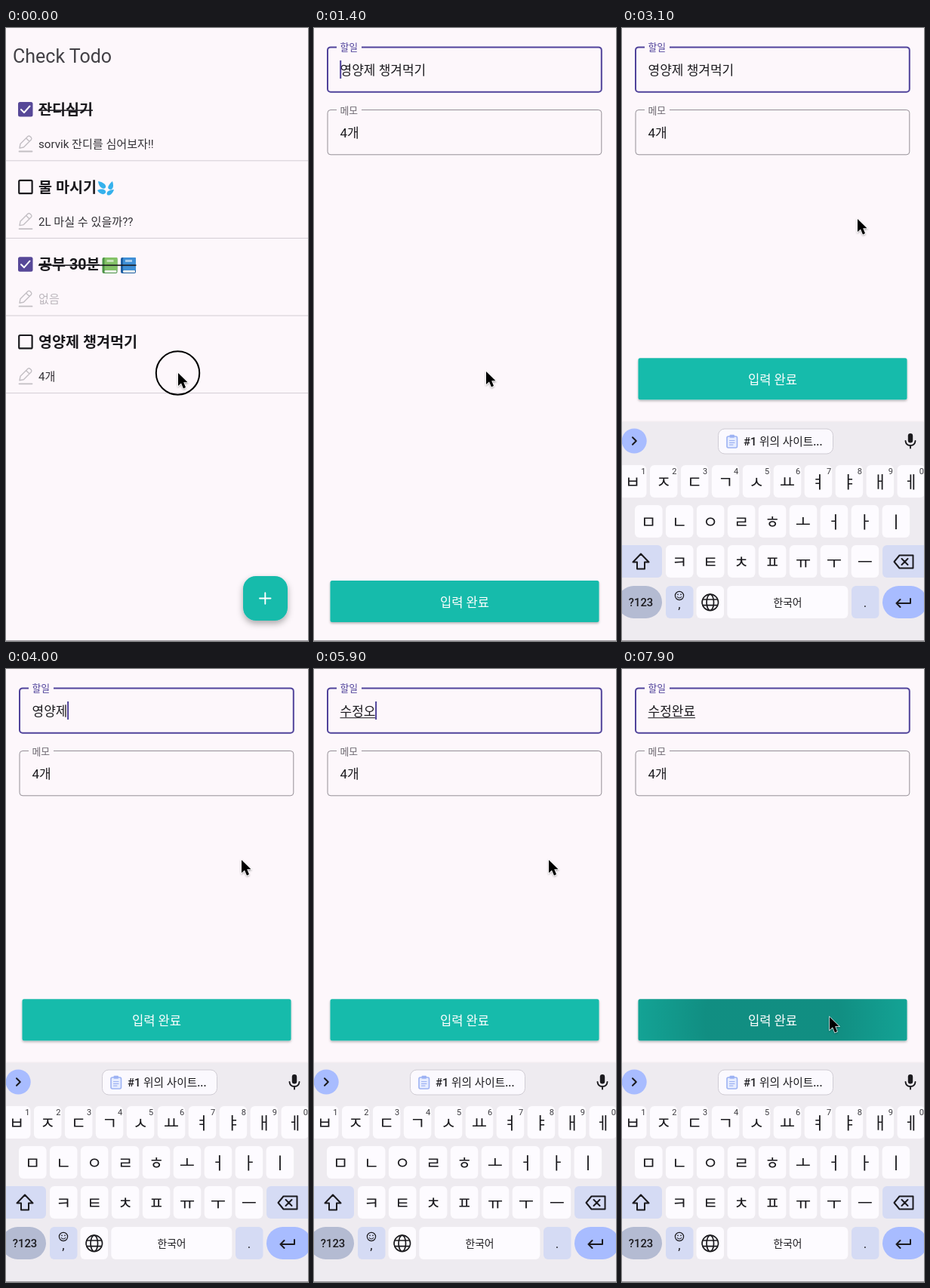
Write an HTML page that moves like this. It is 400 by 812 pixels and loops after 8000 ms.

```html
<!DOCTYPE html>
<html lang="ko">
<head>
<meta charset="utf-8">
<title>Check Todo</title>
<style>
  html, body { margin: 0; height: 100%; overflow: hidden; background: #fdf7fb; }
  svg { display: block; width: 100vw; height: 100vh; }
  text { font-family: Roboto, 'Noto Sans CJK KR', 'Noto Sans CJK', sans-serif; white-space: pre; }
  .line { fill: none; stroke-linecap: round; stroke-linejoin: round; }
</style>
</head>
<body>
<svg id="stage" viewBox="0 0 400 812"></svg>
<script>
const BG = '#fdf7fb', TEAL = '#17bbab', PURPLE = '#50439b', INK = '#1b1a1e';
const LOOP = 8000, STEP = 100;

// Markup helpers
const rect = (x, y, w, h, r, fill, extra = '') =>
  `<rect x="${x}" y="${y}" width="${w}" height="${h}" rx="${r}" fill="${fill}" ${extra}/>`;
const text = (x, y, size, str, fill = INK, extra = '') =>
  `<text x="${x}" y="${y}" font-size="${size}" fill="${fill}" ${extra}>${str}</text>`;
const line = (d, color = INK, width = 2) =>
  `<path class="line" d="${d}" stroke="${color}" stroke-width="${width}"/>`;
const at = (x, y, body) => `<g transform="translate(${x} ${y})">${body}</g>`;
const middle = 'text-anchor="middle"';

// Todo list
const drops = at(120, 201,
  `<g fill="#35b1ec"><path d="M2 2C8 3 13 6 12 10C10 14 3 11 2 2Z"/>
   <path d="M21 2C23 8 22 13 18 13C13 12 15 7 21 2Z"/>
   <path d="M1 14C7 11 13 13 12 17C10 21 4 19 1 14Z"/>
   <path d="M23 13C21 19 17 22 14 20C12 16 17 13 23 13Z"/></g>`);
const book = (x, color, dark) => at(x, 304,
  rect(0, 0, 20, 21, 2, dark) + rect(3, 17, 16, 3, 1, '#eef1ee') +
  rect(3, 0, 17, 17, 1, color) + rect(6, 3, 9, 3, 0, '#ffffff', 'opacity=".55"'));

const pencil = line('M17.5 163.5H34.5', '#c3bfc4', 1.8) +
  line('M18 159L19 153.5L29 143.5Q30.5 142.3 32 143.7L33.3 145Q34.5 146.5 33.3 148L23.3 158Z M26.7 146L31 150.3', '#c3bfc4', 1.4);

function todo(row, title, memo, done, strikeEnd, memoColor = '#333136') {
  const box = done
    ? rect(16, 98, 19.5, 19.5, 2.5, '#574898') + line('M20 108L24 112L31.5 103.5', '#fff', 2)
    : rect(17.2, 99.2, 17.4, 17.4, 1.5, 'none', `stroke="${INK}" stroke-width="2.2"`);
  return at(0, row * 102.6, box + pencil +
    text(43, 115.2, 19.6, title, INK, 'font-weight="bold"') +
    (done ? rect(43, 108.3, strikeEnd - 43, 1.6, 0, INK) : '') +
    text(43, 159, 15.1, memo, memoColor) + rect(0, 175.3, 400, 1, 0, '#d3ced4'));
}

const listScreen = text(9, 46, 25, 'Check Todo', '#434146') +
  book(127.5, '#84c267', '#4d9447') + book(152, '#3f8fd6', '#1f5fa3') +
  todo(0, '잔디심기', 'sorvik 잔디를 심어보자!!', true, 115) +
  todo(1, '물 마시기', '2L 마실 수 있을까??') +
  todo(2, '공부 30분', '없음', true, 172.5, '#bcb7bd') +
  todo(3, '영양제 챙겨먹기', '4개') + drops +
  rect(314, 726, 59, 59, 17, TEAL, 'filter="url(#fabShadow)"') +
  line('M336 755.5H350.5M343.3 748.3V762.8', '#fff', 1.9);

// Edit form
const outline = (id, y, color, width, label, labelColor) =>
  rect(18, y, 362.8, 59.3, 4, 'none', `id="${id}" stroke="${color}" stroke-width="${width}"`) +
  rect(30, y - 2, 33, 5, 0, BG) + text(34.5, y + 5, 12.8, label, labelColor);

const formScreen = rect(0, 0, 400, 812, 0, BG) +
  outline('todoBox', 25.4, PURPLE, 2, '할일', PURPLE) +
  text(34.5, 62, 17, '', INK, 'id="todoText"') +
  rect(34.5, 64.2, 0, 1, 0, INK, 'id="underline"') +
  rect(34.2, 43, 2, 24, 0, PURPLE, 'id="caret"') +
  `<g id="memo">${outline('memoBox', 108.5, '#948f96', 1, '메모', '#6d6870')}
   ${text(34.5, 145.3, 17, '4개')}</g>
   <g id="button">${rect(21.5, 0, 356, 55, 2.5, TEAL, 'filter="url(#buttonShadow)"')}
   ${rect(21.5, 0, 356, 55, 2.5, 'url(#ripple)', 'id="press"')}
   ${text(199.5, 35, 16.6, '입력 완료', '#fff', middle)}</g>`;

// Keyboard
const KEY = '#fdfbff', TINT = '#d5dbf4', BLUE = '#a8bcff', PITCH = 40.95;
const key = (x, y, w = 36.5, fill = KEY, r = 6) => rect(x, y, w, 43, r, fill);
const jamoRow = (letters, x, y) => [...letters].map((letter, i) =>
  key(x + i * PITCH, y) +
  text(x + 18.2 + i * PITCH, y + 29.5, 22, letter, INK, middle)).join('');
const digits = [...'1234567890'].map((digit, i) =>
  text(28.3 + i * PITCH, 591, 11, digit, '#3a393e', middle)).join('');

const keyboard = rect(0, 522, 400, 300, 0, '#eeebf0', 'filter="url(#edge)"') +
  `<circle cx="16.2" cy="547" r="16.5" fill="${BLUE}"/>` +
  line('M14 542.3L18.8 547L14 551.7', INK, 2) +
  rect(127.5, 531, 152, 33, 8.5, '#fbf9fe', 'stroke="#d0ccd4"') +
  rect(139, 541, 13.5, 15, 2, '#e6ecff', 'stroke="#9db2f3" stroke-width="1.6"') +
  rect(142.5, 538.7, 6.5, 4, 1, '#9db2f3') +
  line('M142.5 546.5H149M142.5 549.3H149M142.5 552.1H147', '#9db2f3', 1.2) +
  text(161, 552.5, 14.7, '#1 위의 사이트...', INK, 'font-weight="500"') +
  rect(378.8, 537, 6.4, 12.5, 3.2, INK) +
  line('M375.5 547Q376 553 382 553Q388 553 388.5 547M382 553V556.5', INK, 1.9) +
  jamoRow('ㅂㅈㄷㄱㅅㅛㅕㅑㅐㅔ', -4, 579) + digits +
  jamoRow('ㅁㄴㅇㄹㅎㅗㅓㅏㅣ', 17, 632) +
  key(-8, 685, 61, TINT) + jamoRow('ㅋㅌㅊㅍㅠㅜㅡ', 58, 685) + key(345, 685, 63, TINT) +
  line('M25 696.5L35.5 707.5H30V716.5H20V707.5H14.5Z', INK, 2) +
  line('M367.5 698.5H385.5V715.5H367.5L360.5 707ZM370.5 703L378.5 711M378.5 703L370.5 711', INK, 2) +
  key(-6, 739, 59, '#b4bbd2', 21.5) + text(25, 766, 14.8, '?123', INK, middle + ' font-weight="500"') +
  key(58, 739, 36.5, TINT) +
  `<circle cx="76" cy="752" r="5.6" fill="none" stroke="${INK}" stroke-width="1.2"/>` +
  line('M74 750.3V750.5M78 750.3V750.5', INK, 1.6) + line('M73.2 753.5Q76 756.6 78.8 753.5', INK, 1.1) +
  text(76, 769, 17, ',', INK, middle) +
  key(98.5, 739) +
  `<g fill="none" stroke="${INK}" stroke-width="1.7"><circle cx="116.8" cy="760.8" r="10.7"/>
   <ellipse cx="116.8" cy="760.8" rx="4.7" ry="10.7"/></g>` +
  line('M107.4 757H126.2M107.4 764.6H126.2', INK, 1.6) +
  key(139.3, 739, 160) + text(219.5, 765.5, 13.8, '한국어', INK, middle) +
  key(304, 739, 36.5, TINT) + text(322, 767, 17, '.', INK, middle) +
  key(345, 739, 59, BLUE, 21.5) +
  line('M382 756V762H363.5M368.5 757L363.5 762L368.5 767', INK, 2);

document.getElementById('stage').innerHTML = `
<defs>
  <filter id="fabShadow" x="-30%" y="-30%" width="160%" height="170%">
    <feDropShadow dx="0" dy="4" stdDeviation="4" flood-opacity=".32"/></filter>
  <filter id="buttonShadow" x="-5%" y="-20%" width="110%" height="150%">
    <feDropShadow dx="0" dy="1.8" stdDeviation="1.6" flood-opacity=".28"/></filter>
  <filter id="edge" x="-2%" y="-3%" width="104%" height="106%">
    <feDropShadow dx="0" dy="-1" stdDeviation="1" flood-opacity=".06"/></filter>
  <filter id="cursorShadow" x="-40%" y="-30%" width="190%" height="170%">
    <feDropShadow dx="0" dy="1.2" stdDeviation="1" flood-opacity=".35"/></filter>
  <radialGradient id="ripple" gradientUnits="userSpaceOnUse" cx="199" cy="27" r="178">
    <stop offset=".5" stop-opacity=".24"/><stop offset="1" stop-opacity=".13"/></radialGradient>
</defs>
${rect(0, 0, 400, 812, 0, BG)}
<g id="list">${listScreen}</g>
<g id="form">${formScreen}</g>
<g id="keyboard">${keyboard}</g>
${rect(0, 811, 400, 1, 0, '#9b979c')}
<circle id="ring" cx="227.5" cy="457" r="28.7" fill="none" stroke="#000" stroke-width="2"/>
<path id="cursor" d="M1 1V18L5 14.4L8 21.4L11 20.1L8.2 13.3H13.5Z" stroke="#fff"
  stroke-width="1.3" paint-order="stroke" filter="url(#cursorShadow)"/>`;

const ids = ['list', 'form', 'keyboard', 'ring', 'cursor', 'todoBox', 'todoText',
  'underline', 'caret', 'memo', 'button', 'press', 'ripple'];
const el = Object.fromEntries(ids.map(id => [id, document.getElementById(id)]));
const set = (id, attrs) => {
  for (const name in attrs) el[id].setAttribute(name, attrs[name]);
};
const progress = (t, from, to) => Math.min(1, Math.max(0, (t - from) / (to - from)));
const smooth = p => p * p * (3 - 2 * p);

// Text edits: each entry is [time, text], and restarts the caret blink
const OLD = '영양제 챙겨먹기';
const typed = ['ㅅ', '수', '숮', '수저', '수정', '수정ㅇ', '수정오', '수정와', '수정완', '수정완ㄹ', '수정완료'];
const edits = [[1300, OLD], [3300, OLD],
  ...[...OLD].map((_, i) => [3600 + i * 100, OLD.slice(0, OLD.length - 1 - i)]),
  ...typed.map((str, i) => [5000 + i * 140, str])];

// Pointer stops: [time, x, y]
const pointer = [[0, 227, 456], [800, 227, 456], [900, 227, 454], [2300, 227, 454], [2900, 311, 252],
  [4400, 311, 252], [4600, 310, 252], [6500, 310, 252], [7100, 280, 445], [7200, 280, 445],
  [7600, 274, 460], [LOOP, 274, 460]];

function pointerAt(t) {
  const i = pointer.findIndex(stop => stop[0] > t);
  const [t0, x0, y0] = pointer[i - 1], [t1, x1, y1] = pointer[i];
  const p = smooth(progress(t, t0, t1));
  return `translate(${x0 + (x1 - x0) * p} ${y0 + (y1 - y0) * p})`;
}

function draw(t) {
  set('ring', { opacity: t < 100 ? 1 : t < 200 ? 0.4 : 0 });
  set('cursor', { transform: pointerAt(t) });

  const enter = progress(t, 900, 1300);
  set('list', { opacity: enter < 1 ? 1 : 0 });
  set('form', { opacity: enter, transform: `translate(0 ${40 * (1 - enter) ** 3})` });

  const [editTime, value] = edits.filter(edit => edit[0] <= t).pop() || edits[0];
  el.todoText.textContent = value;
  const width = value ? el.todoText.getComputedTextLength() : 0;
  const shrink = value ? 0 : 2;
  const caretOn = t >= 1300 && (t - editTime) % 1000 < 500;
  set('todoBox', { height: 59.3 - shrink });
  set('memo', { transform: `translate(0 ${-shrink})` });
  set('underline', { width: t >= 5000 ? width : 0 });
  set('caret', { x: 34.2 + (t < 3300 ? 0 : width), y: 43 - shrink / 2, opacity: caretOn ? 1 : 0 });

  const rise = progress(t, 1500, 2000);
  set('keyboard', { transform: `translate(0 ${290 * (1 - rise) ** 3})`, opacity: rise > 0 ? 1 : 0 });
  set('button', { transform: `translate(0 ${t < 1600 ? 732 : 437.2})` });

  const press = progress(t, 7700, 7900);
  set('press', { opacity: press });
  set('ripple', { cx: 274 - 75 * press, r: 60 + 118 * press });
}

function tick() {
  draw(Math.floor((performance.now() % LOOP) / STEP) * STEP);
  requestAnimationFrame(tick);
}
tick();
</script>
</body>
</html>
```
